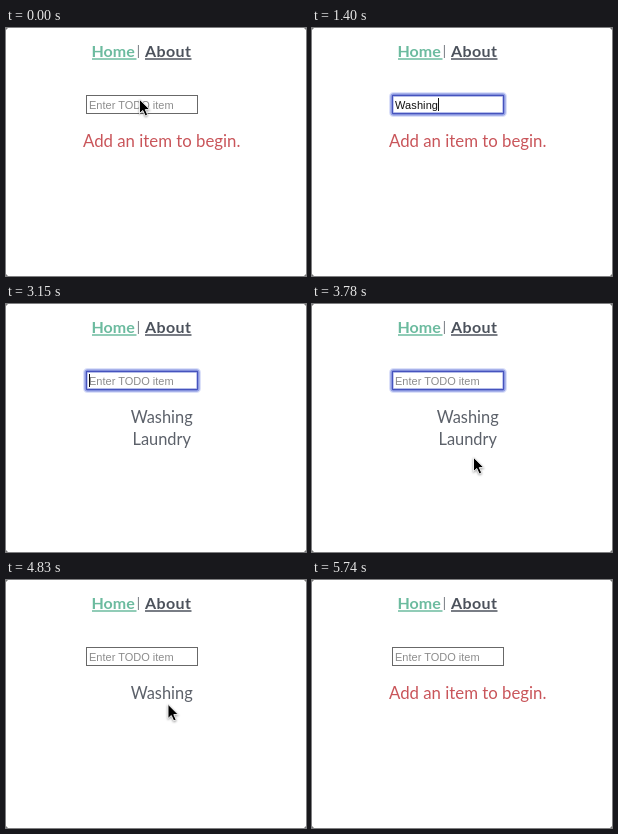
An HTML page that plays this animation: 300 px wide and 248 px high, repeating every 6230 ms.

```html
<!DOCTYPE html>
<html lang="en">
<head>
<meta charset="utf-8">
<title>Todo list</title>
<style>
  html, body { margin: 0; width: 100%; height: 100%; overflow: hidden; background: #fff; }
  svg { display: block; }
  .page { font: 16.4px Lato, "Open Sans", sans-serif; fill: #5c616a; }
  .nav { font-size: 16px; font-weight: 700; }
  .home { fill: #6cbb9f; }
  .about { fill: #4c525c; letter-spacing: .4px; }
  .error { font-size: 16.8px; fill: #c9555a; }
  .field { font: 11px "Liberation Sans", Arial, sans-serif; fill: #111; }
  .hint { fill: #8c8c8c; }
  #typed { letter-spacing: .1px; }
  #arrow { filter: drop-shadow(0 1px 1px #0006); }
</style>
</head>
<body>
<svg width="300" height="248" viewBox="0 0 300 248">
  <path d="M0 0h2L0 2zM300 0v2l-2-2zM0 248v-2l2 2zM300 248h-2l2-2z" fill="#777"/>
  <g class="page">
    <g class="nav">
      <text class="home" x="85.5" y="29">Home</text>
      <text class="about" x="139" y="29">About</text>
    </g>
    <path d="M86 31h44.5" stroke="#6cbb9f" stroke-width="1.4"/>
    <path d="M139 31h46.5" stroke="#4c525c" stroke-width="1.4"/>
    <path d="M132.4 17v13" stroke="#777b82"/>
    <text class="error" id="error" x="77" y="119">Add an item to begin.</text>
    <g text-anchor="middle">
      <text id="first" x="155.7" y="119">Washing</text>
      <text id="second" x="155.7" y="141">Laundry</text>
    </g>
  </g>
  <rect x="80.5" y="67.5" width="111" height="18" fill="#fff" stroke="#686868"/>
  <g id="ring" fill="none">
    <rect x="79.5" y="66.5" width="113" height="20" rx="2" stroke="#c5cdf5" stroke-opacity=".6" stroke-width="5"/>
    <rect x="79.5" y="66.5" width="113" height="20" rx="2" stroke="#98a4e6" stroke-width="2.4"/>
    <rect x="80.5" y="67.5" width="111" height="18" rx=".5" stroke="#4653bd" stroke-width="1.3"/>
  </g>
  <g class="field">
    <text class="hint" id="hint" x="83" y="81">Enter TODO item</text>
    <text id="typed" x="83" y="81"></text>
  </g>
  <path id="caret" d="M.5 70v13" stroke="#111"/>
  <path id="arrow" d="M-.5-.7v14.2l3.3-3 2.4 5.4 2.5-1.1-2.4-5.2h4.5z"
        fill="#000" stroke="#fff" stroke-width=".9"/>
  <g id="beam" fill="none" stroke-linecap="round">
    <path d="M-3-8Q0-8 0-5V5Q0 8-3 8M3-8Q0-8 0-5M0 5Q0 8 3 8M-2 3H2" stroke="#fff" stroke-width="2.6"/>
    <path d="M-3-8Q0-8 0-5V5Q0 8-3 8M3-8Q0-8 0-5M0 5Q0 8 3 8M-2 3H2" stroke="#222" stroke-width="1.1"/>
  </g>
</svg>
<script>
  const LOOP = 6230, TICK = 70;
  const ids = ["error", "first", "second", "ring", "hint", "typed", "caret", "arrow", "beam"];
  const ui = Object.fromEntries(ids.map(id => [id, document.getElementById(id)]));

  // Each word: key press times, then the time Enter clears the field.
  const words = [
    { text: "Washing", keys: [560, 840, 910, 1120, 1260, 1330, 1400], enter: 1540 },
    { text: "Laundry", keys: [1960, 2170, 2240, 2310, 2730, 2940, 3080], enter: 3150 }
  ];
  const focus = [[0, 0], [70, .4], [140, .75], [210, 1], [4480, .4], [4550, 0]];

  // time, pointer shape, x, y
  const pointer = [
    [0, "arrow", 134, 72], [140, "beam", 136, 77], [560, ""],
    [3570, "arrow", 162, 170], [3640, "arrow", 162, 165], [3710, "arrow", 162, 159],
    [3780, "arrow", 162, 154], [3850, "arrow", 162, 149], [3920, "beam", 163, 145],
    [3990, "beam", 163, 142], [4060, "beam", 163, 140], [4130, "beam", 163, 139],
    [4200, "beam", 163.5, 138.5], [4550, "arrow", 162, 138], [4830, "arrow", 162.5, 125],
    [4900, "beam", 164, 120.5], [5040, "beam", 164, 119], [5110, "beam", 164, 118],
    [5180, "beam", 164.5, 117.5], [5600, "arrow", 160, 150], [5670, "arrow", 156, 217],
    [5740, ""]
  ];

  const latest = (list, t) => list.findLast(step => step[0] <= t);
  const within = (t, a, b) => t >= a && t < b;
  const show = (el, on) => el.setAttribute("visibility", on ? "visible" : "hidden");
  const move = (el, x, y) => el.setAttribute("transform", `translate(${x} ${y})`);

  function typedAt(t) {
    const word = words.find(w => t < w.enter);
    return word ? word.text.slice(0, word.keys.filter(k => k <= t).length) : "";
  }

  function draw(now) {
    const t = Math.floor(now % LOOP / TICK) * TICK;
    const text = typedAt(t);
    ui.typed.textContent = text;
    show(ui.hint, !text);
    show(ui.first, within(t, 1540, 5390));
    show(ui.second, within(t, 3150, 4550));
    show(ui.error, !within(t, 1540, 5390));

    ui.ring.setAttribute("opacity", latest(focus, t)[1]);
    show(ui.caret, within(t, 140, 4480) && !within(t, 3640, 4200));
    move(ui.caret, Math.round(83 + (text ? ui.typed.getComputedTextLength() : 0)), 0);

    const [, shape, x, y] = latest(pointer, t);
    for (const kind of ["arrow", "beam"]) show(ui[kind], shape === kind);
    if (shape) move(ui[shape], x, y);
    requestAnimationFrame(draw);
  }
  draw(performance.now());
</script>
</body>
</html>
```
